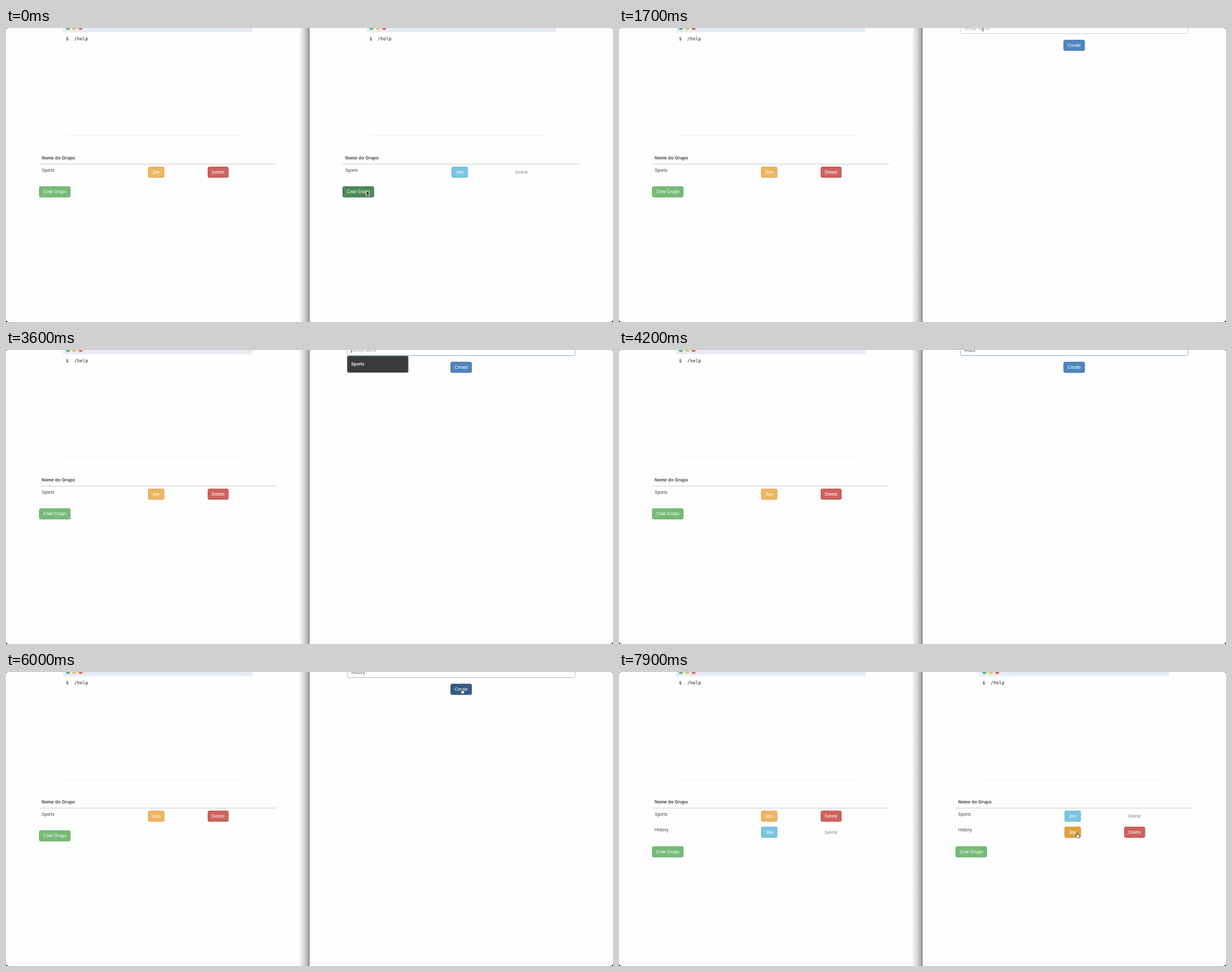
An HTML page for the animation above (8000 ms loop, 936 px wide and 454 px high).

```html
<!DOCTYPE html>
<html lang="pt">
<head>
<meta charset="utf-8">
<title>Grupos</title>
<style>
html, body { margin: 0; width: 100%; height: 100%; overflow: hidden; background: #fff; }
svg { display: block; width: 936px; height: 454px; }
text { font: 6.8px "Liberation Sans", Arial, sans-serif; fill: #444; white-space: pre; }
.bold { font-weight: bold; }
.mono { font: 7.05px "DejaVu Sans Mono", monospace; fill: #222; }
.mid { text-anchor: middle; }
</style>
</head>
<body>
<svg viewBox="0 0 936 454">
  <defs>
    <linearGradient id="shade">
      <stop offset="0" stop-color="#f3f3f3"/>
      <stop offset=".5" stop-color="#d6d6d6"/>
      <stop offset="1" stop-color="#a2a2a2"/>
    </linearGradient>
  </defs>
  <rect width="936" height="454" fill="#fefefe"/>
  <g id="left"></g>
  <rect x="453" width="14" height="454" fill="url(#shade)"/>
  <rect x="467" width="1" height="454" fill="#727272"/>
  <g id="right"></g>
  <path d="M0 454v-4q0 4 5 4zM936 454v-4q0 4-5 4zM0 0v2q0-2 3-2zM936 0v2q0-2-3-2z" fill="#111"/>
  <g id="pointer"></g>
</svg>
<script>
const LOOP = 8000, STEP = 100;
const FORM_OPEN = 300, FOCUS = 1900, CREATED = 6300;
const GREEN = ['#76bb76', '#65ad65'], ORANGE = ['#ecb661', '#e0a75a'];
const RED = ['#cf625e', '#b9524e'], CYAN = ['#78c5e2', '#6bb9d6'];
const $ = id => document.getElementById(id);

const pathA = [[0, 556, 251.5], [200, 556, 251.5], [500, 560, 145], [800, 566, 48.5],
  [900, 565, 30], [1400, 561, 1], [1900, 561, 1], [2100, 561, 8.5], [2300, 561, 8.5], [2700, 558, -12]];
const pathB = [[4900, 690, -12], [5000, 742, 28], [5200, 800, 84.5], [5300, 804, 82],
  [5700, 703, 25.5], [6200, 703, 25.5], [6600, 698, 285], [6800, 701, 300],
  [7100, 699, 292], [7500, 706.5, 248], [8000, 706.5, 248]];

const text = (x, y, s, cls = '', fill = '') =>
  `<text x="${x}" y="${y}" class="${cls}"${fill && ` style="fill:${fill}"`}>${s}</text>`;

const rect = (x, y, w, h, fill, stroke = 'none', r = 0) =>
  `<rect x="${x}" y="${y}" width="${w}" height="${h}" rx="${r}" fill="${fill}" stroke="${stroke}"/>`;

const button = (x, y, w, label, [fill, edge]) =>
  rect(x + .5, y + .5, w - 1, 16, fill, edge, 1.8) +
  text(x + w / 2, y + 10.9, label, 'mid', '#fff');

function row(y, name, own, hot) {
  const join = own ? (hot ? ['#e3a039', '#cf9030'] : ORANGE) : CYAN;
  return text(55, y + 7.3, name) + button(219, y, 25.3, 'Join', join) +
    (own ? button(311, y, 32.3, 'Delete', RED)
         : text(327, y + 10.9, 'Delete', 'mid', '#8a8a8a'));
}

function page(rows, create) {
  const dots = ['#53b189', '#edc14a', '#e8605b'].map((c, i) =>
    `<circle cx="${95.5 + i * 9.8}" cy="-.3" r="3.2" fill="${c}"/>`).join('');
  return rect(88, 0, 292, 6.5, '#e7ebf3') + dots +
    text(92.6, 19, '$  /help', 'mono') +
    rect(92, 165.5, 276, 1, '#f2f2f2') +
    text(55, 203.2, 'Nome do Grupo', 'bold') +
    rect(51, 209.6, 365.5, 1, '#cfcfcf') +
    rows.map((r, i) => row(214.2 + i * 24.7, ...r)).join('') +
    button(51, 219.8 + rows.length * 24.7, 48.5, 'Criar Grupo', create);
}

function form(t, hot) {
  const focus = t >= FOCUS && t < 5800;
  const typed = 'History'.slice(0, [3800, 3900, 4000, 4100, 4200, 4200, 4400].filter(k => t >= k).length);
  const caret = t >= FOCUS && t < 3800 && !(t >= 2800 && t < 3100);
  let s = focus ? rect(526, -20, 352, 29, 'none', '#dcebf7', 2.5) : '';
  s += rect(526.5, -20, 351, 28.5, '#fff', focus ? '#9cc6e6' : t < 5800 ? '#d3d3d3' : '#c2c2c2', 2);
  s += typed ? text(532.5, 3, typed, '', '#5c5c5c') : text(532.5, 3, 'Group Name', '', '#a3a3a3');
  if (caret) s += rect(532.3, -3, .7, 7.5, '#333');
  s += button(685.4, 18.3, 33, 'Create', hot ? ['#365b88', '#2a4a72'] : ['#5085bd', '#4474a8']);
  if (t >= 2000 && t < 3800) {
    s += rect(526.5, 9.5, 93.5, 25, '#3a3b3d', '#55565a', 1.5) +
      `<text x="532.3" y="24.3" class="bold" style="font-size:6.4px;fill:#eee">Sports</text>`;
  }
  return s;
}

function spot(t) {
  const keys = [pathA, pathB].find(p => t >= p[0][0] && t <= p[p.length - 1][0]);
  if (!keys) return [-50, -50];
  const i = Math.max(1, keys.findIndex(k => k[0] >= t));
  const [t0, x0, y0] = keys[i - 1], [t1, x1, y1] = keys[i];
  const u = (t - t0) / (t1 - t0);
  return [x0 + (x1 - x0) * u, y0 + (y1 - y0) * u];
}

const shapes = {
  arrow: '<path d="M0 0V7.2L1.7 5.7L2.9 8.3L4.1 7.8L3 5.2H5.2Z" fill="#111" stroke="#fff" stroke-width=".7"/>',
  hand: '<path d="M-.7 .6q.7-1 1.4 0V3.2l2.6.7q.8.3.6 1.2L3.4 8H-.6L-2.7 5.2q0-1 .9-.7l1.1.7z" fill="#fff" stroke="#222" stroke-width=".7"/>',
  beam: '<path d="M-1.3-3.5h2.6M0-3.5v7M-1.3 3.5h2.6" stroke="#333" stroke-width=".7" fill="none"/>'
};

function draw(t) {
  const [x, y] = spot(t);
  const over = (l, top, r, b) => x > l && x < r && y > top && y < b;
  const inForm = t >= FORM_OPEN && t < CREATED, done = t >= CREATED;
  const onCreate = inForm && over(685, 18, 718, 35);
  const onJoin = done && over(687, 239, 712, 256);
  const onField = inForm && t < 2000 && over(526, -20, 878, 9);

  const leftRows = [['Sports', true]], rightRows = [['Sports', false]];
  if (done) {
    leftRows.push(['History', false]);
    rightRows.push(['History', true, onJoin]);
  }
  $('left').innerHTML = page(leftRows, GREEN);
  $('right').innerHTML = inForm ? form(t, onCreate)
    : `<g transform="translate(468)">${page(rightRows, done ? GREEN : ['#4d8d54', '#2f6763'])}</g>`;
  const kind = onField ? 'beam' : onCreate || onJoin ? 'hand' : 'arrow';
  $('pointer').innerHTML = `<g transform="translate(${x} ${y})">${shapes[kind]}</g>`;
}

let last = -1;
function tick() {
  const t = Math.floor(performance.now() % LOOP / STEP) * STEP;
  if (t !== last) draw(last = t);
  requestAnimationFrame(tick);
}
tick();
</script>
</body>
</html>
```
